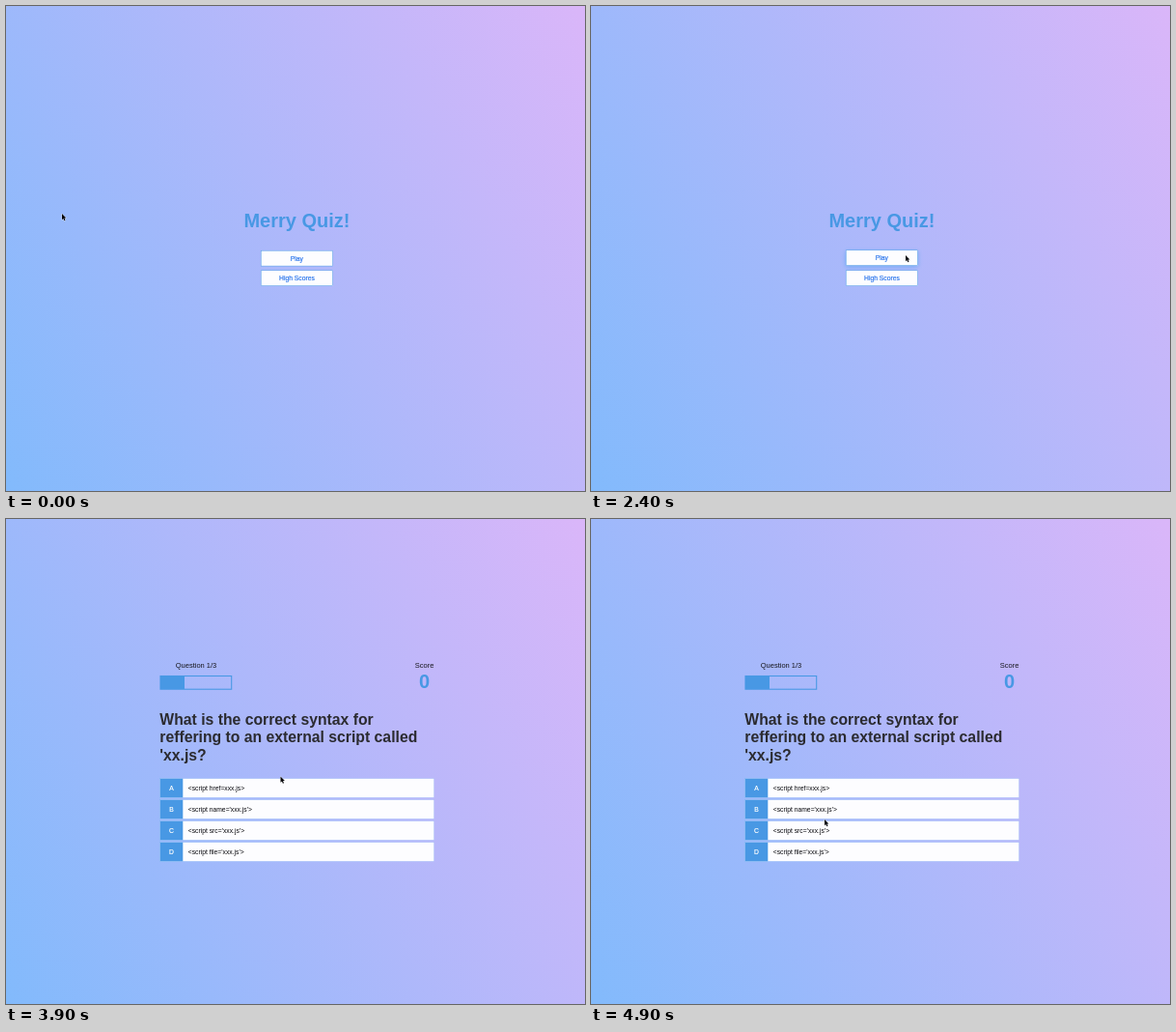
Write an HTML page with a canvas that moves like this. It is 600 px wide and 502 px high and loops after 5 s.

```html
<!DOCTYPE html>
<html lang="en">
<head>
<meta charset="utf-8">
<title>Quiz demo</title>
<style>
  html, body { margin: 0; width: 100%; height: 100%; overflow: hidden; }
  canvas { display: block; }
</style>
</head>
<body>
<canvas id="stage" width="600" height="502"></canvas>
<script>
const ctx = document.getElementById('stage').getContext('2d');
const W = 600, H = 502, LOOP = 5000, STEP = 100;
const BLUE = '#4898e4', LINK = '#2f78ec', DARK = '#2b2b30';
const FONT = '"Liberation Sans", Arial, sans-serif';
const ARROW_AT = 2400, QUIZ_AT = 2500;

const point = (x, y) => ({ x, y });
const HOME = point(58, 215);

// Pointer sweeps: each curves from the last resting place past "via" to "to".
const SWEEPS = [
  { start: 0, end: 100, via: point(98, 219), to: point(137, 223) },
  { start: 200, end: 800, via: point(430, 518), to: point(338, 225) },
  { start: 800, end: 1200, via: point(153, 250), to: point(343, 217) },
  { start: 1300, end: 1500, via: point(328, 291), to: point(326, 258) },
  { start: 2500, end: 3200, via: point(600, 55), to: point(141, 303) },
  { start: 3200, end: 3800, via: point(375, 235), to: point(320, 162) },
  { start: 3800, end: 3900, via: point(302, 214), to: point(284.5, 266.5) },
  { start: 3900, end: 4400, via: point(235, 365), to: point(241, 294.5) },
  { start: 4400, end: 4900, via: point(243, 110), to: point(242, 311) }
];

const curve = (a, b, c, k) => (1 - k) ** 2 * a + 2 * k * (1 - k) * b + k * k * c;

function pointerAt(t) {
  let from = HOME;
  for (const { start, end, via, to } of SWEEPS) {
    if (t <= start) break;
    if (t < end) {
      const k = (t - start) / (end - start);
      return point(curve(from.x, via.x, to.x, k), curve(from.y, via.y, to.y, k));
    }
    from = to;
  }
  return from;
}

const BUTTONS = ['Play', 'High Scores'].map((label, i) =>
  ({ label, x: 264.2, y: 253.2 + i * 20.6, w: 74.4, h: 15.9 }));
const ROWS = ['href=xxx.js', "name='xxx.js'", "src='xxx.js'", "file='xxx.js'"].map((attr, i) =>
  ({ letter: 'ABCD'[i], label: '<' + 'script ' + attr + '>', x: 159.7, y: 268.7 + i * 22, w: 283.8, h: 19.6 }));

const background = (() => {
  const a = 62 * Math.PI / 180, sx = Math.sin(a), sy = -Math.cos(a);
  const half = (W * Math.abs(sx) + H * Math.abs(sy)) / 2;
  const g = ctx.createLinearGradient(W / 2 - sx * half, H / 2 - sy * half, W / 2 + sx * half, H / 2 + sy * half);
  g.addColorStop(0, '#82bafc');
  g.addColorStop(1, '#dab6f9');
  return g;
})();

// "weight" thickens small glyphs a little.
function text(str, x, y, size, color, { bold = false, align = 'left', weight = 0 } = {}) {
  ctx.font = `${bold ? 'bold ' : ''}${size}px ${FONT}`;
  ctx.textAlign = align;
  ctx.fillStyle = ctx.strokeStyle = color;
  ctx.fillText(str, x, y);
  if (weight) {
    ctx.lineWidth = weight;
    ctx.strokeText(str, x, y);
  }
}

const inside = (p, b) => p.x >= b.x && p.x <= b.x + b.w && p.y >= b.y && p.y <= b.y + b.h;

function card(b, hovered, border) {
  ctx.save();
  if (hovered) {
    ctx.shadowColor = 'rgba(70,160,240,0.6)';
    ctx.shadowBlur = 5.25;
    ctx.shadowOffsetY = 1.2;
  }
  ctx.fillStyle = '#fdfdff';
  ctx.fillRect(b.x, b.y, b.w, b.h);
  ctx.restore();
  ctx.strokeStyle = border;
  ctx.lineWidth = 0.5;
  ctx.strokeRect(b.x, b.y, b.w, b.h);
}

function lifted(hovered, draw) {
  ctx.save();
  if (hovered) ctx.translate(0, -0.4);
  draw();
  ctx.restore();
}

function drawHome(hoverPoint) {
  text('Merry Quiz!', 301.4, 229.3, 20, BLUE, { bold: true, align: 'center' });
  for (const b of BUTTONS) {
    const hovered = inside(hoverPoint, b);
    lifted(hovered, () => {
      card(b, hovered, BLUE);
      text(b.label, b.x + b.w / 2, b.y + 10.4, 6.75, LINK, { align: 'center', weight: 0.2 });
    });
  }
}

function drawQuiz(hoverPoint) {
  text('Question 1/3', 197, 154.2, 7.5, '#18181e', { align: 'center' });
  text('Score', 433.5, 154.2, 7.5, '#18181e', { align: 'center' });
  text('0', 433.5, 175, 20, BLUE, { bold: true, align: 'center' });

  ctx.fillStyle = ctx.strokeStyle = BLUE;
  ctx.fillRect(160, 162.5, 25, 13.5);
  ctx.lineWidth = 1.1;
  ctx.strokeRect(160, 162.5, 73.7, 13.7);

  ['What is the correct syntax for', 'reffering to an external script called', "'xx.js?"]
    .forEach((line, i) => text(line, 159.3, 213 + i * 18.4, 15.75, DARK, { bold: true }));

  for (const r of ROWS) {
    const hovered = inside(hoverPoint, r);
    lifted(hovered, () => {
      card(r, hovered, 'rgba(86,165,235,0.3)');
      ctx.fillStyle = BLUE;
      ctx.fillRect(r.x, r.y, 23.6, r.h);
      text(r.letter, 171.4, r.y + 12.3, 6.75, '#fff', { align: 'center', weight: 0.2 });
      text(r.label, 188.8, r.y + 12.3, 6.75, '#08080c');
    });
  }
}

function drawArrow({ x, y }) {
  const p = new Path2D('M0 0V6.3L1.4 5L2.4 7.3L3.5 6.8L2.5 4.6H4.4Z');
  ctx.save();
  ctx.translate(x, y);
  ctx.lineWidth = 0.8;
  ctx.strokeStyle = 'rgba(255,255,255,0.75)';
  ctx.stroke(p);
  ctx.fillStyle = '#08080c';
  ctx.fill(p);
  ctx.restore();
}

function drawHand({ x, y }) {
  const p = new Path2D('M-.8 .6Q0 -.4 .8 .6V3Q3.6 2.4 3.8 4V5.5L2.9 7.6H-.4L-2.6 4.7Q-2.4 3.7 -.8 4.7Z');
  ctx.save();
  ctx.translate(x + 0.3, y + 0.8);
  ctx.scale(0.9, 0.9);
  ctx.fillStyle = '#fff';
  ctx.fill(p);
  ctx.lineWidth = 0.7;
  ctx.strokeStyle = '#25252c';
  ctx.stroke(p);
  ctx.restore();
}

function frame(elapsed) {
  const t = Math.floor((elapsed % LOOP) / STEP) * STEP;
  const pointer = pointerAt(t);
  const quiz = t >= QUIZ_AT;

  ctx.fillStyle = background;
  ctx.fillRect(0, 0, W, H);
  // Hover styling trails the pointer by one step.
  (quiz ? drawQuiz : drawHome)(pointerAt(t - STEP));

  const loading = t >= ARROW_AT && t <= QUIZ_AT;
  const clickable = (quiz ? ROWS : BUTTONS).some(b => inside(pointer, b));
  (clickable && !loading ? drawHand : drawArrow)(pointer);
}

const start = performance.now();
function tick() {
  frame(performance.now() - start);
  requestAnimationFrame(tick);
}
tick();
</script>
</body>
</html>
```
